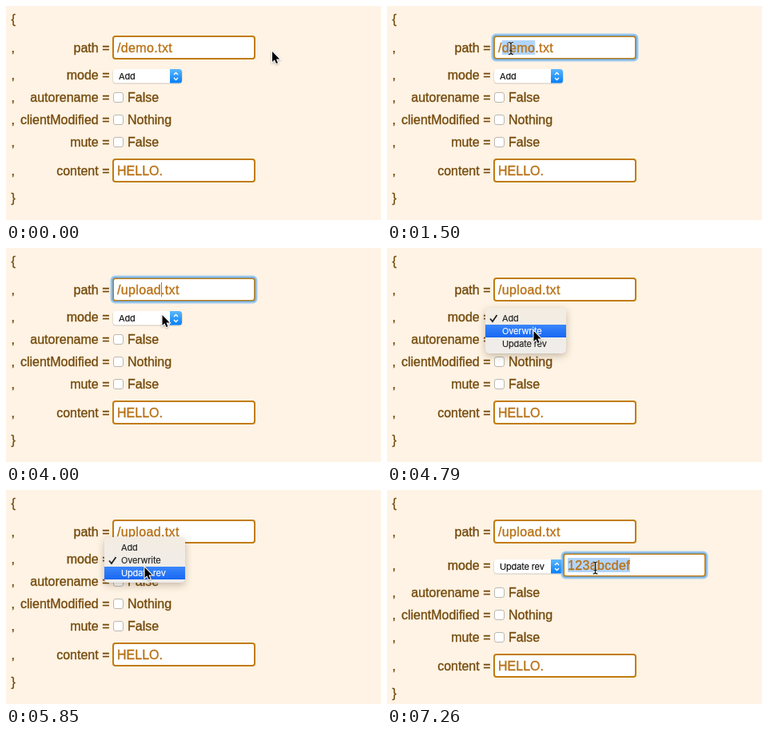
An HTML page for the animation above (8 s loop, 469 by 268 pixels).

```html
<!DOCTYPE html>
<html lang="en">
<head>
<meta charset="utf-8">
<title>Upload arguments form</title>
<style>
  html, body { margin: 0; width: 100%; height: 100%; overflow: hidden; background: #fef3e4; }
  svg { display: block; width: 469px; height: 268px; user-select: none; cursor: default; }
  text {
    font: 16px "Liberation Sans", Arial, sans-serif; white-space: pre;
    color: #744a0c; fill: currentColor; stroke: currentColor; stroke-width: .35px;
  }
  .field text { color: #b97114; }
  .field .box { fill: #fff; stroke: #c27c0e; stroke-width: 2; }
  .spaced { letter-spacing: .36px; }
  .ring rect { fill: none; }
  .small { font: 11px Inter, "Open Sans", sans-serif; letter-spacing: -.15px; color: #111; stroke-width: .15px; }
  #menu { filter: drop-shadow(0 3px 5px rgba(70, 50, 20, .3)); }
  #arrow { stroke: #fff; stroke-width: 2; paint-order: stroke; filter: drop-shadow(0 1px 1px rgba(0, 0, 0, .3)); }
</style>
</head>
<body>
<svg id="stage" viewBox="0 0 469 268">
  <defs>
    <linearGradient id="blue" x2="0" y2="1">
      <stop stop-color="#5cb8fc"/><stop offset="1" stop-color="#057df8"/>
    </linearGradient>
    <linearGradient id="bar" x2="0" y2="1">
      <stop stop-color="#3a86fb"/><stop offset="1" stop-color="#1868f3"/>
    </linearGradient>
    <linearGradient id="paper" x2="0" y2="1">
      <stop stop-color="#f3ece2"/><stop offset="1" stop-color="#efedeb"/>
    </linearGradient>
  </defs>
</svg>
<script>
const LOOP = 8000;
const STEP = 88.6;
const stage = document.getElementById('stage');

function el(tag, attrs = {}, parent = stage, label = '') {
  const node = document.createElementNS('http://www.w3.org/2000/svg', tag);
  for (const key in attrs) node.setAttribute(key, attrs[key]);
  if (label) node.textContent = label;
  parent.appendChild(node);
  return node;
}
const set = (node, key, value) => node.setAttribute(key, value);
const show = (node, on) => set(node, 'visibility', on ? 'inherit' : 'hidden');
const move = (node, x, y) => set(node, 'transform', `translate(${x} ${y})`);
const clamp = (v, lo = 0, hi = 1) => Math.min(hi, Math.max(lo, v));
const smooth = u => u * u * (3 - 2 * u);

function makeRow(name, y, parent = stage) {
  const g = el('g', {}, parent);
  el('text', { x: 6.5, y }, g, ',');
  el('text', { x: 129.5, y, 'text-anchor': 'end' }, g, name + ' =');
  return g;
}

function makeRing(parent, x, y, width, height, r) {
  const g = el('g', { class: 'ring' }, parent);
  el('rect', { x: x - 1, y: y - 1, width: width + 2, height: height + 2, rx: r + 1,
    stroke: '#7dbdf4', 'stroke-width': 3, opacity: .7 }, g);
  el('rect', { x, y, width, height, rx: r,
    stroke: '#68a6d8', 'stroke-width': 1.5, opacity: .7 }, g);
  return g;
}

function makeField(parent, x, y, value, cls = '') {
  const g = el('g', { class: 'field' }, parent);
  el('rect', { class: 'box', x: x + 1, y: y + 1, width: 177, height: 28, rx: 3 }, g);
  const ring = makeRing(g, x, y, 179, 30, 3.5);
  const mark = el('rect', { y: y + 6, height: 18, fill: '#b2d5fc' }, g);
  const text = el('text', { x: x + 6, y: y + 21, class: cls }, g, value);
  const caret = el('rect', { y: y + 6, width: 1, height: 18, fill: '#b97114' }, g);
  const edge = n => x + 6 + (n ? text.getSubStringLength(0, n) : 0);
  return function update({ value, focus = false, caretAt = 0, select = [0, 0] }) {
    if (value && text.textContent !== value) text.textContent = value;
    show(ring, focus);
    show(caret, caretAt > 0);
    set(caret, 'x', Math.round(edge(caretAt)));
    set(mark, 'x', edge(select[0]));
    set(mark, 'width', edge(select[1]) - edge(select[0]));
  };
}

// Form
el('text', { x: 6.5, y: 22 }, stage, '{');
const updatePath = makeField(makeRow('path', 58), 133, 37, '/demo.txt', 'spaced');

const modeRow = makeRow('mode', 92);
el('rect', { x: 133.5, y: 79.5, width: 87, height: 18, rx: 4, fill: '#cfc8be' }, modeRow);
el('rect', { x: 134, y: 79, width: 86, height: 17.5, rx: 3.5, fill: '#fff' }, modeRow);
el('path', { d: 'M205 79h11.5q3.5 0 3.5 3.5v10.5q0 3.5-3.5 3.5H205z', fill: 'url(#blue)' }, modeRow);
el('path', { d: 'M210 86l2.5-2.5 2.5 2.5M210 90l2.5 2.5 2.5-2.5', fill: 'none', stroke: '#fff', 'stroke-width': 1.4 }, modeRow);
const modeRing = makeRing(modeRow, 133.5, 79, 86.5, 18, 4);
const modeText = el('text', { x: 141, y: 92, class: 'small' }, modeRow);
const revBox = el('g', {}, modeRow);
const updateRev = makeField(revBox, 220, 71, '123abcdef', 'spaced');

const lower = el('g');
['autorename False', 'clientModified Nothing', 'mute False'].forEach((pair, i) => {
  const [name, label] = pair.split(' ');
  const y = 120 + i * 28;
  const row = makeRow(name, y, lower);
  el('rect', { x: 134.5, y: y - 11.5, width: 12, height: 12, rx: 2.5, fill: '#fff', stroke: '#bcb8b2' }, row);
  el('text', { x: 152, y }, row, label);
});
makeField(makeRow('content', 212, lower), 133, 191, 'HELLO.')({});
el('text', { x: 6.5, y: 246 }, lower, '}');

// Popup menu
const OPTIONS = ['Add', 'Overwrite', 'Update rev'];
const ROW = 16;
const menu = el('g', { id: 'menu' });
el('rect', { x: 123, y: 75, width: 101, height: 57, rx: 5, fill: 'url(#paper)' }, menu);
const bar = el('rect', { x: 123, width: 101, height: ROW, fill: 'url(#bar)' }, menu);
const items = OPTIONS.map((name, i) => el('text', { x: 144, y: 92 + i * ROW, class: 'small' }, menu, name));
const tick = el('path', { d: 'M129 88.5l3 3.5 5.5-8', fill: 'none', 'stroke-width': 1.8 }, menu);

// Pointers
const arrow = el('path', { id: 'arrow', d: 'M.5 1V14L3.4 11.2 5.5 16 7.5 15.2 5.5 10.4H9.7Z' });
const beam = el('g', { fill: 'none' });
const beamPath = 'M-3-7.5Q0-7.5 0-5.5Q0-7.5 3-7.5M0-5.5V5.5M-3 7.5Q0 7.5 0 5.5Q0 7.5 3 7.5M-2 3H2';
el('path', { d: beamPath, stroke: '#fff', 'stroke-width': 2.4, opacity: .6 }, beam);
el('path', { d: beamPath, stroke: '#111', 'stroke-width': 1.2 }, beam);

// Story, with all times counted in steps
const CLICK = 13, DOUBLE_CLICK = 17, TYPE = 35, POINT = 44;
const LEAVE = 75, REVISE = 76, REV_CLICK = 80, REV_SELECT = 82;

const PICKS = [
  { open: 50, blink: 57, back: 58, fade: 59, done: 60, from: 0, to: 1 },
  { open: 64, blink: 71, back: 73, fade: 73, done: REVISE, from: 1, to: 2 }
];

const HOME = { x: 332.5, y: 56 };
const GLIDES = [
  { start: 0, end: 8, x: 155, y: 53, lift: 13 },
  { start: 43, end: 45, x: 195, y: 83 },
  { start: 45, end: 49, x: 188, y: 87 },
  { start: 51, end: 54, x: 183, y: 103 },
  { start: 59, end: 62, x: 178, y: 87 },
  { start: 64, end: 66, x: 173, y: 96 },
  { start: 67, end: 69, x: 172, y: 98 },
  { start: 73, end: LEAVE, x: 234.5, y: 102.5 },
  { start: LEAVE, end: 79, x: 260.5, y: 97.5 }
];

function pointerAt(step) {
  let { x, y } = HOME;
  for (const g of GLIDES) {
    const u = smooth(clamp((step - g.start) / (g.end - g.start)));
    x += (g.x - x) * u;
    y += (g.y - y) * u - (g.lift || 0) * Math.sin(Math.PI * u);
  }
  return { x, y };
}

function pathAt(step) {
  const focus = step >= CLICK && step < PICKS[0].open;
  if (step < CLICK) return { focus };
  if (step < DOUBLE_CLICK) return { focus, caretAt: 2 };
  if (step < TYPE) return { focus, select: [1, 5] };
  // three keys, one step of rest, three more keys
  const typed = clamp(step - TYPE + 1, 0, 3) + clamp(step - TYPE - 3, 0, 3);
  return { value: `/${'upload'.slice(0, typed)}.txt`, focus, caretAt: focus ? typed + 1 : 0 };
}

function drawMenu(step, pointerY) {
  const pick = PICKS.findLast(p => p.open <= step);
  const opacity = pick ? clamp(1 - .4 * Math.max(0, step - pick.fade + 1)) : 0;
  const visible = opacity > .1 && step < pick.fade + 2;
  show(menu, visible);
  if (!visible) return;

  const shift = -ROW * pick.from;
  const blinking = step >= pick.blink && step < pick.back;
  const hover = Math.floor((pointerY - 80 - shift) / ROW);
  const lit = blinking ? -1 : step >= pick.blink ? pick.to : hover;
  set(menu, 'opacity', opacity);
  move(menu, 0, shift);
  show(bar, lit >= 0);
  set(bar, 'y', 80 + lit * ROW);
  items.forEach((item, i) => { item.style.color = i === lit ? '#fff' : '#222'; });
  set(tick, 'stroke', pick.from === lit ? '#fff' : '#222');
  move(tick, 0, pick.from * ROW);
}

function render(t) {
  const step = Math.floor((t + 15) / STEP);
  const { x, y } = pointerAt(step);

  updatePath({ value: '/demo.txt', ...pathAt(step) });

  const mode = PICKS.filter(p => p.done <= step).length;
  const revising = step >= REVISE;
  modeText.textContent = OPTIONS[mode];
  show(modeRing, mode > 0 && step < REV_CLICK);
  show(revBox, revising);
  updateRev({
    focus: step >= REV_CLICK,
    caretAt: step >= REV_CLICK && step < REV_SELECT ? 4 : 0,
    select: step >= REV_SELECT ? [0, 9] : [0, 0]
  });
  move(modeRow, 0, revising ? 8 : 0);
  move(lower, 0, revising ? 14 : 0);
  drawMenu(step, y);

  const typing = step >= TYPE && step < POINT;
  const overText = (step < TYPE && x < 312) || step >= LEAVE;
  show(arrow, !typing && !overText);
  show(beam, !typing && overText);
  move(arrow, x, y);
  move(beam, x, y);
}

const start = performance.now();
function frame() {
  render((performance.now() - start) % LOOP);
  requestAnimationFrame(frame);
}
frame();
</script>
</body>
</html>
```
